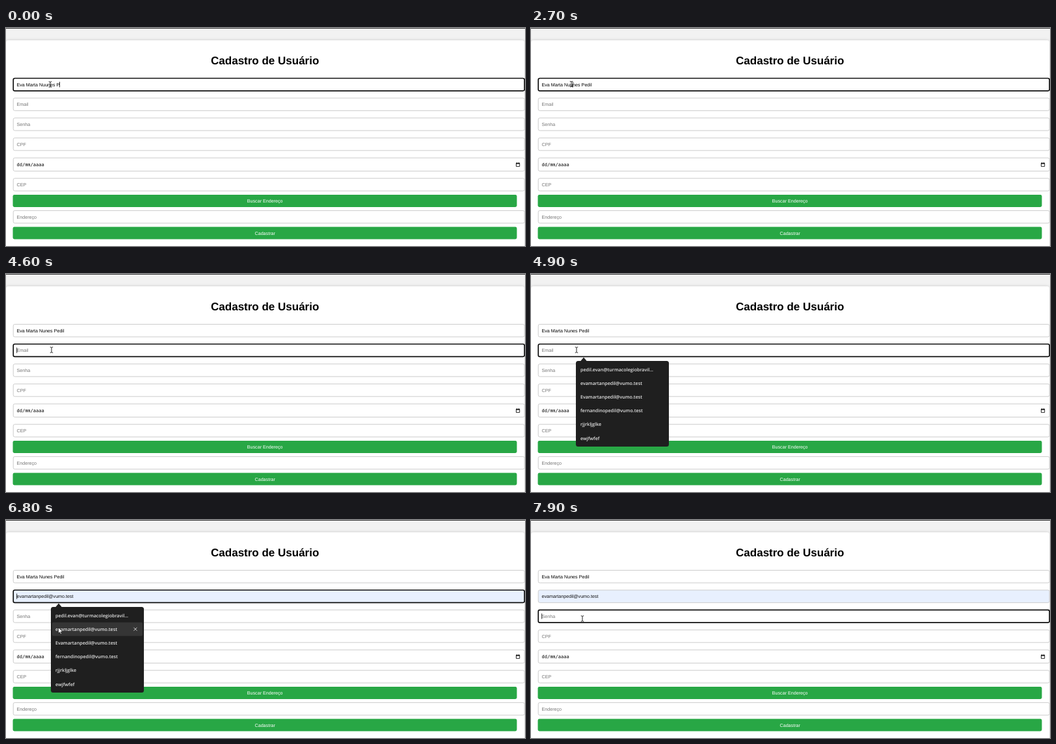
Recreate the animation shown at these times as an HTML page. Size 798 px wide and 336 px high, loop 8000 ms.

```html
<!DOCTYPE html>
<html lang="pt-BR">
<head>
<meta charset="utf-8">
<title>Cadastro de Usuário</title>
<style>
  html, body { margin: 0; width: 100%; height: 100%; overflow: hidden; background: #f2f2f2; }
  svg { display: block; width: 798px; height: 336px; }
  text { font: 7.15px "Liberation Sans", Arial, sans-serif; text-rendering: geometricPrecision; white-space: pre; }
  .title { font-size: 17px; font-weight: 700; text-anchor: middle; }
  .label { fill: #fff; text-anchor: middle; }
  .hint { fill: #757575; }
  .date { font: 7px "DejaVu Sans Mono", "Liberation Mono", monospace; }
  .item { font: 600 7.1px "Open Sans", "Noto Sans", sans-serif; fill: #e6e6e6; }
  .field { fill: #fff; stroke: #ccc; stroke-width: 1; }
  .field.filled { fill: #e8f0fe; }
  .field.focus { stroke: #101010; stroke-width: 1.7; }
</style>
</head>
<body>
<svg id="stage" viewBox="0 0 798 336">
  <defs>
    <filter id="soft" x="-5%" y="-5%" width="110%" height="110%">
      <feDropShadow dx="0" dy="0" stdDeviation="2" flood-color="#000" flood-opacity=".18"/>
    </filter>
  </defs>
  <rect width="798" height="336" fill="#f2f2f2"/>
  <rect width="798" height="1" fill="#3b3b3b"/>
  <rect y="19" width="797" height="330" rx="4" fill="#fff" filter="url(#soft)"/>
  <text class="title" x="398.2" y="56.4">Cadastro de Usuário</text>
  <g id="form"></g>
  <g fill="none" stroke="#111" stroke-width=".9">
    <path d="M784.5 208.4h5.2v5h-5.2z"/>
    <path d="M784.2 208.8h5.8" stroke-width="1.5"/>
    <path d="M785.6 207v1.5M788.6 207v1.5"/>
  </g>
  <rect id="caret" width=".8" height="8.4" fill="#000"/>
  <g id="popup">
    <path d="M75.5 135L81 128.6L86.5 135z" fill="#1f1f1f"/>
    <rect x="69" y="134" width="143" height="132" rx="3.5" fill="#1f1f1f"/>
    <g id="hover">
      <rect x="71" y="157.7" width="139" height="21" rx="2" fill="#353535"/>
      <path d="M196.4 165.7l5 5m0 -5l-5 5" stroke="#ddd" stroke-width=".9"/>
    </g>
  </g>
  <path id="beam" d="M-2.2 -4.3Q0 -4.3 0 -3.3Q0 -4.3 2.2 -4.3M0 -3.4V3.4M-2.2 4.3Q0 4.3 0 3.3Q0 4.3 2.2 4.3"
        fill="none" stroke="#222" stroke-width="1"/>
  <path id="arrow" d="M0 0V9.2L2.1 7.3L3.5 10.4L5 9.7L3.7 6.7H6.5z" fill="#fff" stroke="#111" stroke-width=".7"/>
</svg>
<script>
const LOOP = 8000, STEP = 100;
const $ = id => document.getElementById(id);

function add(parent, tag, attrs, text = '') {
  const el = document.createElementNS('http://www.w3.org/2000/svg', tag);
  for (const key in attrs) el.setAttribute(key, attrs[key]);
  el.textContent = text;
  parent.append(el);
  return el;
}

function field(y, hint, h = 19.4, cls = 'hint') {
  const mid = y + h / 2;
  const box = add($('form'), 'rect', { class: 'field', x: 11.2, y, width: 786, height: h, rx: 2.4 });
  const text = add($('form'), 'text', { class: cls, x: 16.5, y: mid + 2.5 }, hint);
  return { y, h, mid, hint, box, text };
}

function button(y, label) {
  add($('form'), 'rect', { x: 10.5, y, width: 775, height: 19, rx: 2.4, fill: '#28a745' });
  add($('form'), 'text', { class: 'label', x: 398.2, y: y + 12 }, label);
}

const fullName = field(77.5, '');
const email = field(108, 'Email');
const password = field(138.7, 'Senha');
const fields = [fullName, email, password, field(169.4, 'CPF'),
  field(200.2, 'dd/mm/aaaa', 20.4, 'date'), field(231.7, 'CEP'), field(281.4, 'Endereço')];
button(257, 'Buscar Endereço');
button(306.5, 'Cadastrar');

const address = 'evamartanpedil@vumo.test';
['pedil.evan@turmacolegiobravil...', address, 'Evamartanpedil@vumo.test',
 'fernandinopedil@vumo.test', 'rjjrkljglke', 'ewjfwfef'].forEach((s, i) =>
  add($('popup'), 'text', { class: 'item', x: 76, y: 149.6 + i * 21.2 }, s));

const names = [
  [0, 'Eva Marta Nuunes P'],
  [500, 'Eva Marta Nuunes Ped'],
  [700, 'Eva Marta Nuunes Pedil'],
  [3000, 'Eva Marta Nunes Pedil']
];
const focus = [[0, fullName], [4600, email], [7800, password]];
// Start, end, number of characters before the caret
const carets = [
  [0, 500, 18], [500, 700, 20], [700, 900, 22], [2700, 3000, 13], [3000, 3500, 12], [4000, 4400, 12],
  [4600, 4900, 0], [5200, 6000, 0], [6800, 7100, 0], [7800, 8000, 0]
];
// Time, x, y of the pointer
const path = [
  [0, 68, 87], [1300, 68, 87], [1600, 65, 86], [1800, 60, 85.5], [2000, 62, 86.5],
  [3400, 62, 86.5], [3700, 90, 184], [3900, 88, 180], [4300, 70, 122], [4400, 70, 117],
  [5900, 70, 117], [6300, 68.5, 165], [6600, 80.5, 165.5],
  [7400, 80.5, 165.5], [7700, 79, 152], [8000, 79, 152]
];

const current = (table, t) => table.filter(row => row[0] <= t).pop()[1];

function pointer(t) {
  const i = path.findIndex(p => p[0] > t);
  const [t0, x0, y0] = path[i - 1], [t1, x1, y1] = path[i];
  const k = (t - t0) / (t1 - t0);
  return [x0 + (x1 - x0) * k, y0 + (y1 - y0) * k];
}

const show = (el, on) => el.setAttribute('visibility', on ? 'visible' : 'hidden');

function setText(f, s, color) {
  if (f.text.textContent !== s) f.text.textContent = s;
  f.text.style.fill = color;
}

function draw(t) {
  const [x, y] = pointer(t);
  const open = t >= 4700 && t < 7100;
  const inPopup = open && x >= 69 && y >= 134;
  const hover = inPopup && x > 70 && y > 158 && y < 179;
  const filled = hover || t >= 7100;
  const active = current(focus, t);

  fields.forEach(f => f.box.classList.toggle('focus', f === active));
  email.box.classList.toggle('filled', filled);
  setText(fullName, current(names, t), '#000');
  setText(email, filled ? address : email.hint, filled ? '#111' : '#757575');

  const caret = carets.find(c => c[0] <= t && t < c[1]);
  show($('caret'), caret);
  if (caret) {
    const before = caret[2] ? active.text.getSubStringLength(0, caret[2]) : 0;
    $('caret').setAttribute('x', 16.3 + before);
    $('caret').setAttribute('y', active.mid - 4.3);
  }

  show($('popup'), open);
  show($('hover'), hover);
  const overField = !inPopup && fields.some(f => y >= f.y && y <= f.y + f.h);
  for (const [id, on] of [['beam', overField], ['arrow', !overField]]) {
    show($(id), on);
    $(id).setAttribute('transform', `translate(${x} ${y})`);
  }
}

function frame() {
  const t = performance.now() % LOOP;
  draw(Math.floor(t / STEP) * STEP);
  requestAnimationFrame(frame);
}
frame();
</script>
</body>
</html>
```
